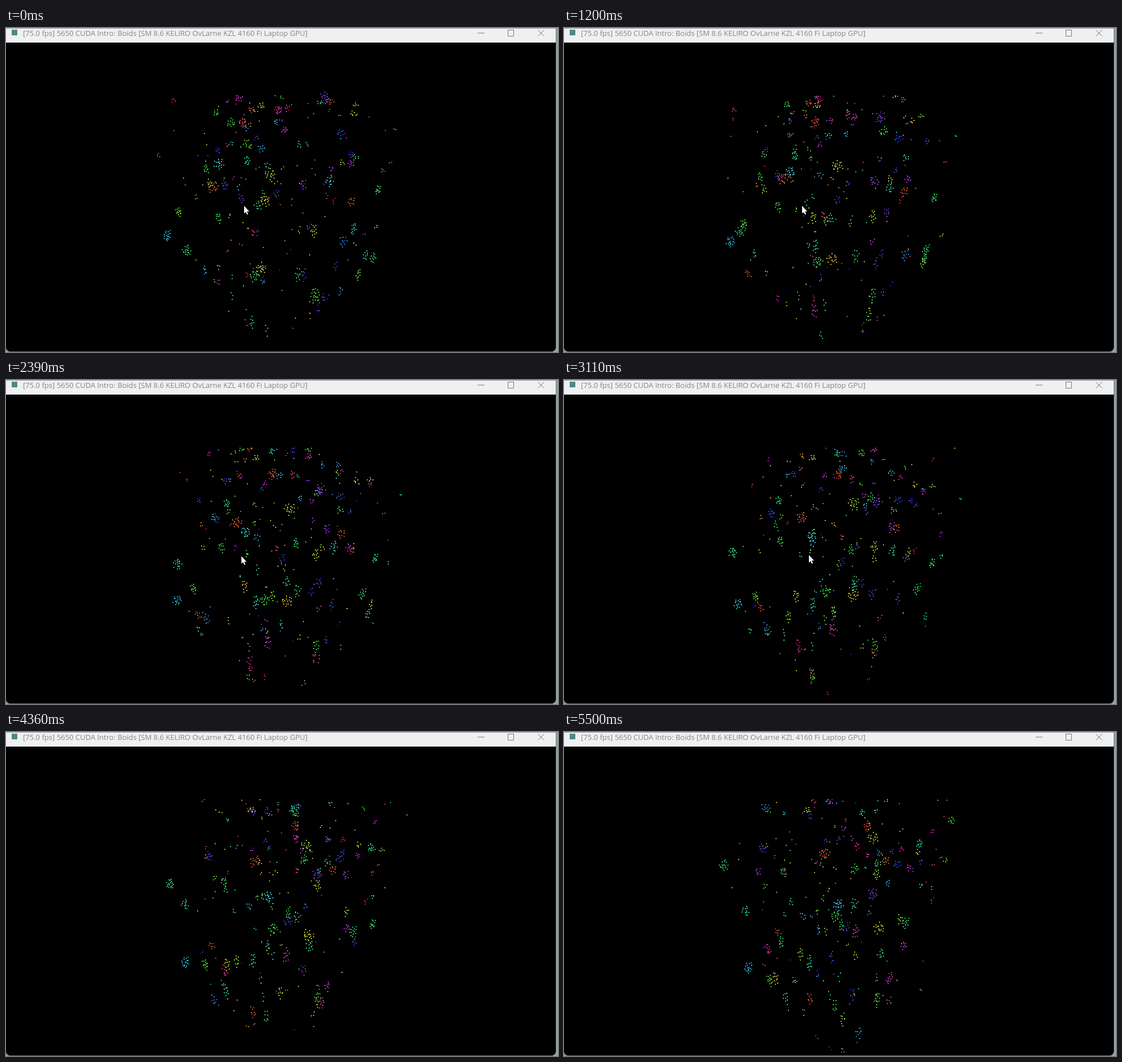
These frames come from a looping animation (976x574 px, 5.52 s). An HTML page with a canvas:

```html
<!DOCTYPE html>
<html lang="en">
<head>
<meta charset="utf-8">
<title>Boids</title>
<style>
  html, body { margin: 0; width: 100%; height: 100%; overflow: hidden; background: #95a1a3; }
  .window {
    position: absolute; left: 0; top: 0; width: 972px; height: 573px;
    background: #000; border-radius: 0 0 8px 8px; overflow: hidden;
    box-shadow: 0 0 0 1px #66757a;
  }
  .bar {
    position: absolute; inset: 0 0 auto; height: 26px; box-sizing: border-box;
    background: #f0f0f0; border-top: 1px solid #8d8d8d; border-bottom: 1px solid #c4c4c4;
  }
  .icon { position: absolute; left: 10px; top: 2px; width: 10px; height: 10px; background: #4f8886; }
  .title {
    position: absolute; left: 30px; top: -1px; white-space: pre;
    font: 13px/18px "Open Sans", "Noto Sans", sans-serif; color: #858585;
  }
  .buttons { position: absolute; left: 830px; top: -1px; fill: none; stroke: #777; }
  canvas { position: absolute; left: 0; top: 0; }
</style>
</head>
<body>
<div class="window">
  <canvas id="view" width="972" height="573"></canvas>
  <div class="bar">
    <div class="icon"></div>
    <div class="title">[75.0 fps] 5650 CUDA Intro: Boids [SM 8.6 KELIRO OvLarne KZL 4160 Fi Laptop GPU]</div>
    <svg class="buttons" width="130" height="20">
      <path d="M4 9H16M57.5 3.5H67.5V14.5H57.5ZM110.5 3.5l11 11m0 -11l-11 11"/>
    </svg>
  </div>
</div>
<script>
const LOOP = 5520;
const STEPS = 92;
const ctx = document.getElementById('view').getContext('2d');
const start = performance.now();

let seed = 20417;
function rand() {
  seed = (seed * 1664525 + 1013904223) % 4294967296;
  return seed / 4294967296;
}
const spread = a => (rand() * 2 - 1) * a;
const wrap = v => v - Math.floor(v);
const mix = (a, b, k) => a + (b - a) * k;

// Members packed in a loose, tilted oval
function members(n, hue) {
  const tilt = rand() * 6.28, squash = 0.6 + rand() * 0.4;
  return Array.from({ length: n }, (_, i) => {
    const r = 2.4 * Math.sqrt(i + 0.5), a = i * 2.4 + tilt;
    return {
      dx: r * Math.cos(a) * squash + spread(1.2),
      dy: r * Math.sin(a) + spread(1.2),
      phase: rand() * 6.28,
      color: `hsl(${hue + spread(14)} ${75 + rand() * 25}% ${50 + rand() * 18}%)`
    };
  });
}

// Flocks that cross the view in a straight line
const flock = (hue, from, to) => ({ from, to, dots: members(17, hue) });
const large = [
  flock(5, [418, 166], [536, 165]),
  flock(82, [466, 258], [546, 186]),
  flock(268, [562, 122], [545, 286]),
  flock(177, [376, 240], [485, 305]),
  flock(150, [319, 394], [282, 236]),
  flock(16, [366, 280], [460, 214]),
  flock(55, [450, 425], [556, 346]),
  flock(128, [439, 438], [480, 325]),
  flock(192, [284, 367], [325, 417])
];

// Flocks drifting through a box that wraps at its faces
const small = Array.from({ length: 180 }, () => ({
  pos: [rand(), rand(), rand()],
  vel: [spread(0.3), spread(0.38), spread(0.4)],
  dots: members(1 + Math.floor(13 * rand() ** 2.6), rand() * 360)
}));

// The box is seen corner-on: wide at the top, pointed at the bottom
function project(u, v, w) {
  const side = (2 * u - 1) * 0.63 + (2 * w - 1) * 0.4;
  const depth = 300 + 155 * (1 - Math.abs(side)) * v * v;
  return [485 + side * mix(236, 198, v), 119 + v * depth];
}

function dot(x, y, fill) {
  ctx.fillStyle = fill;
  ctx.fillRect(Math.round(x), Math.round(y), 1.75, 1.75);
}

function drawLarge(k) {
  for (const { from, to, dots } of large) {
    const x = mix(from[0], to[0], k), y = mix(from[1], to[1], k);
    for (const d of dots) {
      const sway = 1.2 * Math.sin(k * 7 + d.phase);
      dot(x + d.dx + sway, y + d.dy - sway, d.color);
    }
  }
}

function drawSmall(k) {
  for (const f of small) {
    const [u, v, w] = f.pos.map((p, i) => p + f.vel[i] * k);
    for (const d of f.dots) {
      const [x, y] = project(wrap(u + d.dx / 300), wrap(v + d.dy / 330), wrap(w));
      dot(x, y, d.color);
    }
  }
}

// The pointer rests, drifts left, then right, and disappears
const arrow = new Path2D('M0 0V13.5L3 10.8L5 15.5L7 14.6L5 10H9Z');
function drawCursor(t) {
  if (t > 3500) return;
  const ramp = (a, b) => Math.min(1, Math.max(0, (t - a) / (b - a)));
  const left = ramp(1800, 2390), right = ramp(2390, 3110);
  ctx.save();
  ctx.translate(421 - 5 * left + 17 * right, 315 - 3 * left - 2 * right);
  ctx.fillStyle = '#fff';
  ctx.fill(arrow);
  ctx.restore();
}

// The picture advances every 60 ms; two steps are 10 ms shorter
function tick() {
  const t = (performance.now() - start) % LOOP;
  const step = Math.floor((t + (t > 1500 ? 10 : 0) + (t > 3955 ? 10 : 0)) / 60);
  const k = step / STEPS;
  ctx.fillStyle = '#000';
  ctx.fillRect(0, 0, 972, 573);
  drawSmall(k);
  drawLarge(k);
  drawCursor(step * 60);
  requestAnimationFrame(tick);
}
tick();
</script>
</body>
</html>
```
